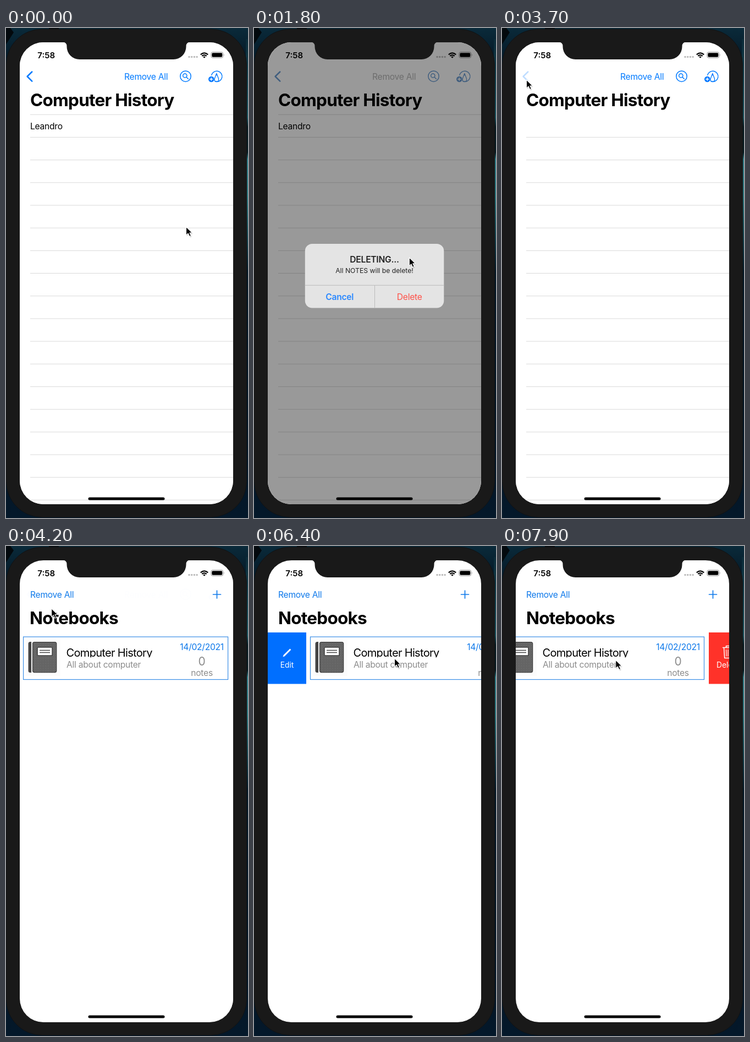
Recreate the animation shown at these times as an HTML page. Size 440 by 890 pixels, loop 8000 ms.

```html
<!DOCTYPE html>
<html lang="en">
<head>
<meta charset="utf-8">
<title>Notes app</title>
<style>
html, body { margin: 0; width: 100%; height: 100%; overflow: hidden; background: #04182a; }
svg { display: block; width: 440px; height: 890px; }
text { font: 400 15.6px Inter, "Liberation Sans", sans-serif; font-optical-sizing: none; letter-spacing: -.016em; }
.title { font-size: 31.5px; font-weight: 700; letter-spacing: -.024em; }
.clock { font-size: 15px; font-weight: 600; letter-spacing: 0; }
.name { font-size: 20px; letter-spacing: -.034em; }
.bold { font-weight: 600; }
.small { font-size: 12.2px; letter-spacing: 0; }
.action { font-size: 13.8px; fill: #fff; letter-spacing: 0; }
.mid { text-anchor: middle; }
.grey { fill: #8c8c8c; }
.blue { fill: #0d78ea; }
.line { fill: none; stroke: currentColor; stroke-linecap: round; stroke-linejoin: round; }
</style>
</head>
<body>
<svg viewBox="0 0 440 890">
  <defs>
    <linearGradient id="wall" x2="0" y2="1">
      <stop offset="0" stop-color="#0a2a3a"/><stop offset=".06" stop-color="#051a28"/>
      <stop offset=".8" stop-color="#031524"/><stop offset="1" stop-color="#04182a"/>
    </linearGradient>
    <linearGradient id="edge" x2="0" y2="1">
      <stop offset="0" stop-color="#0a2a38"/><stop offset=".34" stop-color="#1d5560"/>
      <stop offset=".38" stop-color="#071a20"/><stop offset=".49" stop-color="#071a20"/>
      <stop offset=".52" stop-color="#33808a"/><stop offset=".68" stop-color="#2f7a80"/>
      <stop offset="1" stop-color="#051a28"/>
    </linearGradient>
    <pattern id="weave" width="3" height="3" patternUnits="userSpaceOnUse">
      <rect width="3" height="3" fill="#444"/>
      <path d="M0 0h1.2v1.2H0zM1.5 1.5h1.2v1.2H1.5z" fill="#a8a8a8"/>
    </pattern>
    <clipPath id="screen"><rect x="25" y="26" width="388" height="839" rx="43"/></clipPath>
    <clipPath id="nameBox"><rect x="100" y="180" width="200" height="22.3"/></clipPath>
  </defs>

  <rect width="440" height="890" fill="url(#wall)"/>
  <path d="M0 30L14 8L8 0H0zM78 0h18v4H78z" fill="#03090d"/>
  <rect x="436" y="20" width="4" height="420" fill="url(#edge)"/>
  <rect x=".5" y="2" width="437" height="886.5" rx="65" fill="#191919" stroke="#101214"/>

  <g clip-path="url(#screen)">
    <rect x="25" y="26" width="388" height="839" fill="#fff"/>

    <g id="books">
      <text class="title" x="44" y="142">Notebooks</text>
      <g id="edit">
        <rect x="-400" y="157" width="425" height="93.5" fill="#006fff"/>
        <path d="M-17.5 201.5l1.2-3.4L-4.600 186.400l2 2L-14.300 200.200z" fill="#fff"/>
        <text class="action mid" x="-10" y="221">Edit</text>
      </g>
      <g id="remove">
        <rect x="413" y="157" width="425" height="93.5" fill="#ff3229"/>
        <g class="line" color="#fff" stroke-width="1.5">
          <path d="M438.500 184.500h19M444.500 184v-2.500h7v2.500M440.500 185l1.200 18.500h12.600l1.200-18.500"/>
          <path d="M444.500 188.500l.5 11.500M448 188.500v11.500M451.500 188.500l-.5 11.500" stroke-width="1.200"/>
        </g>
        <text class="action mid" x="448" y="221">Delete</text>
      </g>
      <g id="row">
        <rect x="32.500" y="165" width="372" height="77.500" fill="#fff" stroke="#3a8ee6" stroke-width="1.200"/>
        <rect x="37" y="170" width="63" height="66" fill="#fcfcfc"/>
        <path d="M47 174h-2q-3.500 0-3.500 3.500v49q0 3.500 3.500 3.500h2z" fill="#444"/>
        <rect x="49.600" y="174.600" width="43" height="55" rx="3" fill="url(#weave)" stroke="#444" stroke-width="1.400"/>
        <rect x="58" y="184" width="27" height="15" rx="1.500" fill="#fff" stroke="#444" stroke-width="1.600"/>
        <path d="M62 189.500h19M62 193.500h19" stroke="#444" stroke-width="1.600"/>
        <g clip-path="url(#nameBox)"><text class="name" x="110.500" y="200.500">Computer History</text></g>
        <text class="grey" x="111" y="220.500">All about computer</text>
        <text class="blue mid" x="357" y="188.500">14/02/2021</text>
        <text class="grey mid" x="357" y="217" style="font-size:21px">0</text>
        <text class="grey mid" x="357" y="236">notes</text>
      </g>
    </g>
    <g id="booksNav" color="#0d78ea">
      <text x="44" y="93.500" fill="currentColor">Remove All</text>
      <path class="line" d="M376.500 88h14M383.500 81v14" stroke-width="1.700"/>
    </g>

    <g id="notes">
      <rect x="25" y="26" width="388" height="839" fill="#fff"/>
      <text class="title" x="44" y="142">Computer History</text>
      <path id="rules" stroke="#dadada"/>
      <g id="note">
        <path d="M44 157.300H413" stroke="#dadada"/>
        <text x="44" y="183.500">Leandro</text>
      </g>
    </g>
    <g id="notesNav">
      <path id="back" class="line" d="M47.300 79.500L38.600 88L47.300 96.700" stroke-width="2.500"/>
      <text id="removeAll" x="215" y="93.500">Remove All</text>
      <g class="line" stroke-width="1.500">
        <circle cx="326.500" cy="87.700" r="9.700"/>
        <circle cx="325.300" cy="86.500" r="3.600"/>
        <path d="M328 89.200l3.300 3.300M373.800 85.500A9.700 9.700 0 1 1 381 97.300"/>
        <path d="M382.800 82.500l-3.600 9.500q-.5 4 1.300 5.200h4.700q1.800-1.200 1.300-5.200zM381.800 85.500h2" stroke-width="1.300"/>
      </g>
      <circle cx="373.300" cy="93" r="5.300" fill="currentColor"/>
      <path d="M370.300 93h6M373.300 90v6" stroke="#fff" stroke-width="1.400"/>
    </g>

    <g id="status">
      <text class="clock" x="57.300" y="54.500">7:58</text>
      <path d="M333 52.500h17" stroke="#bcbcbc" stroke-width="3.600" stroke-linecap="round" stroke-dasharray="0 4.700"/>
      <g fill="none" stroke="#000" stroke-width="2.200">
        <path d="M353.800 48.300q6.700-5.800 13.400 0M356.300 50.800q4.200-3.500 8.400 0"/>
      </g>
      <path d="M358.200 52.400q2.300-1.600 4.600 0l-2.300 2.400z"/>
      <rect x="372.800" y="43.700" width="22" height="10.600" rx="3" fill="none" stroke="#999"/>
      <rect x="374.300" y="45.200" width="19" height="7.600" rx="1.700"/>
      <path d="M396 47.200q1.800 1.800 0 3.600z" fill="#999"/>
    </g>

    <rect id="dim" x="25" y="26" width="388" height="839"/>
    <g id="alert" fill="#222">
      <rect x="92.800" y="392" width="252.500" height="116.500" rx="13" fill="#e4e4e4"/>
      <path d="M92.800 467.300H345.300M219.500 467.300V508.500" stroke="#bbb"/>
      <text class="bold mid" x="219" y="426">DELETING...</text>
      <text class="small mid" x="219" y="444.500">All NOTES will be delete!</text>
      <text class="bold mid" x="155.700" y="494" fill="#2a88ff">Cancel</text>
      <text class="mid" x="282.700" y="494" fill="#ff5148">Delete</text>
    </g>
    <rect x="149.500" y="852.500" width="139" height="5" rx="2.500"/>
  </g>

  <path d="M103.500 25.500a7 7 0 0 1 7 7v1.500a23 23 0 0 0 23 23h171a23 23 0 0 0 23-23v-1.500a7 7 0 0 1 7-7z" fill="#191919"/>

  <g id="cursor">
    <path d="M1 2v15l3.600-3 2.800 5.500 2.800-1.300-2.700-5.300h4.700z" fill="#000" opacity=".18"/>
    <path d="M0 0v15.300l3.600-3.300 2.600 5.600 2.800-1.200-2.600-5.400h4.800z" stroke="#fff" stroke-width="1.100" stroke-linejoin="round"/>
  </g>
</svg>

<script>
const LOOP = 8000, STEP = 100;
const el = {};
document.querySelectorAll("svg [id]").forEach(node => el[node.id] = node);

const clamp = v => Math.max(0, Math.min(1, v));
const span = (t, from, to) => clamp((t - from) / (to - from));
const easeOut = u => 1 - (1 - u) ** 3;
const smooth = u => u * u * (3 - 2 * u);
const move = (node, x, y = 0) => node.setAttribute("transform", `translate(${x} ${y})`);
const fade = (node, value) => node.setAttribute("opacity", value);

// Keys are [time, ...values]
function track(t, keys) {
  const next = keys.findIndex(key => key[0] > t);
  if (next === 0) return keys[0].slice(1);
  if (next < 0) return keys[keys.length - 1].slice(1);
  const a = keys[next - 1], b = keys[next];
  const u = smooth(span(t, a[0], b[0]));
  return a.slice(1).map((v, i) => v + (b[i + 1] - v) * u);
}

function mixTint(u) {
  const grey = 180;
  return `rgb(${[0, 122, 255].map(c => Math.round(c + (grey - c) * u))})`;
}

const pointer = [
  [100, 327.5, 361], [850, 255.5, 82.5], [1250, 255.5, 82.5],
  [2000, 288, 488], [2300, 288, 488], [2500, 217.8, 317],
  [3300, 44.5, 94], [3900, 44.5, 94], [5000, 254, 201], [5350, 254, 201],
  [5500, 272, 202], [5800, 330, 204], [5950, 330, 204],
  [6350, 255.5, 204], [6500, 255.5, 204], [7000, 186, 205],
  [7100, 186, 205], [7500, 244, 207], [7650, 244, 207], [7900, 206.7, 207]
];
const swipe = [
  [5400, 0], [5500, 16], [5800, 73], [5950, 70],
  [6500, 70], [7000, 0], [7650, 0], [7900, -37]
];

let rules = "";
for (let i = 1; i < 18; i++) rules += `M44 ${157.3 + 41.18 * i}H413`;
el.rules.setAttribute("d", rules);

function draw(t) {
  const shown = easeOut(span(t, 960, 1330)) * (1 - span(t, 2400, 2600));
  const scale = t < 2400 ? 1 + .29 * (1 - shown) : 1;
  fade(el.dim, .4 * shown);
  fade(el.alert, shown);
  el.alert.setAttribute("transform", `translate(219 450.3) scale(${scale}) translate(-219 -450.3)`);

  el.notesNav.setAttribute("color", mixTint(.6 * shown));
  el.removeAll.setAttribute("fill", mixTint(t >= 950 && t < 2400 ? 1 : 0));
  fade(el.note, 1 - span(t, 2550, 2800));

  fade(el.back, t >= 3650 && t < 3850 ? .25 : 1);
  const pop = easeOut(span(t, 3800, 4300));
  move(el.notes, 388 * pop);
  move(el.books, -116 * (1 - pop));
  fade(el.notesNav, 1 - pop);
  fade(el.booksNav, pop);
  el.notes.style.display = el.notesNav.style.display = pop < 1 ? "" : "none";

  const [dx] = track(t, swipe);
  move(el.row, dx);
  move(el.edit, Math.max(dx, 0));
  move(el.remove, Math.min(dx, 0));
  move(el.cursor, ...track(t, pointer));
}

const start = performance.now();
function tick(now) {
  const t = Math.max(0, now - start) % LOOP;
  draw(Math.floor(t / STEP) * STEP);
  requestAnimationFrame(tick);
}
draw(0);
requestAnimationFrame(tick);
</script>
</body>
</html>
```
